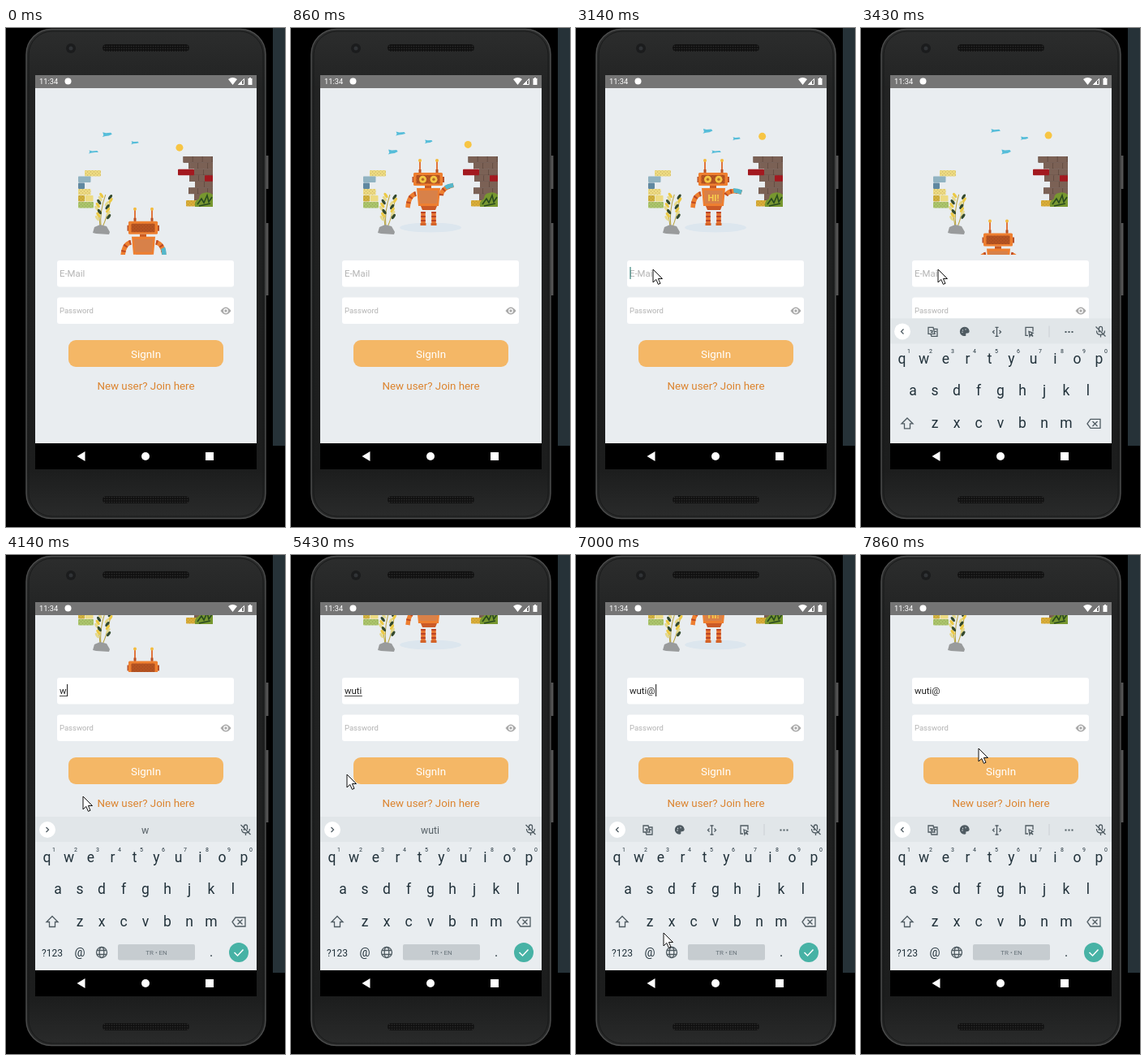
Animation, 344 px wide and 614 px high, one loop 8 s. Source, as an HTML page:

```html
<!DOCTYPE html>
<html lang="en">
<head>
<meta charset="utf-8">
<title>Sign-in screen</title>
<style>
  html, body { margin: 0; width: 100%; height: 100%; overflow: hidden; background: #000; }
  svg { display: block; width: 100vw; height: 100vh; }
  text { font-family: Roboto, "Open Sans", sans-serif; }
  .mid { text-anchor: middle; }
  .line { fill: none; stroke: #4f5b62; stroke-width: 1.3; }
</style>
</head>
<body>
<svg viewBox="0 0 344 614">
  <defs>
    <clipPath id="page"><rect x="36" y="74" width="273" height="437"/></clipPath>
    <clipPath id="art"><rect x="63" y="80" width="218" height="199"/></clipPath>
    <linearGradient id="shell" x2="0" y2="1">
      <stop stop-color="#2c2d2d"/><stop offset=".12" stop-color="#222323"/>
      <stop offset=".9" stop-color="#1c1d1d"/><stop offset="1" stop-color="#2a2b2b"/>
    </linearGradient>
    <pattern id="mesh" width="3" height="3" patternUnits="userSpaceOnUse">
      <rect width="3" height="3" fill="#111"/><circle cx="1.5" cy="1.5" r=".8" fill="#2c2c2c"/>
    </pattern>
    <pattern id="grain" width="4" height="4" patternUnits="userSpaceOnUse">
      <path d="M0 1h1M2 3h1" stroke="#6b3a1c" stroke-opacity=".55"/>
    </pattern>
  </defs>

  <!-- Device -->
  <rect width="344" height="614"/>
  <rect x="329" width="15" height="514" fill="#263238"/>
  <path d="M322 157v41M322 240v89" stroke="#555" stroke-width="3"/>
  <rect x="25" y="1.5" width="295" height="602" rx="31" fill="url(#shell)" stroke="#4b4c4c" stroke-width="1.5"/>
  <rect x="28" y="4" width="289" height="597" rx="29" fill="none" stroke="#191a1a"/>
  <circle cx="80" cy="25" r="6" fill="#1b1c1d"/><circle cx="80" cy="25" r="2.5" fill="#303336"/>
  <rect x="119" y="20" width="107" height="9" rx="4.5" fill="url(#mesh)"/>
  <rect x="119" y="576" width="107" height="9" rx="4.5" fill="url(#mesh)"/>
  <rect x="36" y="58" width="273" height="485" fill="#e9edf0"/>

  <g clip-path="url(#page)">
    <g id="content">
      <g clip-path="url(#art)">
        <g id="bricks"></g>
        <g id="bush">
          <path d="M233 220q-1-8 5-10 0-6 6-7 6-2 11 2v15z" fill="#77972f"/>
          <path d="M236 217l5-7 3 5 4-9 2 8 4-6M238 219l14-3" fill="none" stroke="#294a1f" stroke-width="1.6"/>
        </g>
        <g id="birds" fill="#56bdd9"></g>
        <circle id="sun" r="4.5" fill="#f7c544"/>
        <ellipse id="shadow" cx="172" cy="245.5" rx="38" ry="6" fill="#dce6ee"/>
        <g id="robot">
          <path d="M159 179v-15M180 179v-15" stroke="#df6829" stroke-width="1.8"/>
          <path d="M157.500 178v-4h3v4M178.500 178v-4h3v4" fill="#b95124"/>
          <circle cx="159" cy="163" r="2" fill="#f3bb3d"/><circle cx="180" cy="163" r="2" fill="#f3bb3d"/>
          <path d="M149.500 183h2v7h-2zM187 183h2v7h-2z" fill="#b7522a"/>
          <rect x="151" y="178" width="36" height="16" rx="1.500" fill="#ee7f30"/>
          <rect x="154.500" y="181" width="29" height="10.500" rx="1" fill="#b75321"/>
          <rect x="154.500" y="181" width="29" height="10.500" fill="url(#grain)"/>
          <g id="eyes">
            <g fill="#f4c443"><circle cx="162.500" cy="186.300" r="4.500"/><circle cx="176" cy="186.300" r="4.500"/></g>
            <g fill="#b36a23"><circle cx="162.500" cy="186.300" r="1.700"/><circle cx="176" cy="186.300" r="1.700"/></g>
          </g>
          <rect x="165" y="194" width="8" height="4" fill="#c95b24"/>
          <path d="M155 197h29l-2 22h-25z" fill="#ee7f30"/>
          <path d="M158 200h23l-1 16h-21z" fill="#d88149"/>
          <path d="M160 219h20l-2 5h-16z" fill="#cb5a27"/>
          <g id="greeting"><text class="mid" y="4" font-size="11" font-weight="700" fill="#f8d04c">HI!</text></g>
          <g fill="none" stroke-width="5.500">
            <path d="M163 226v15M176 226v15" stroke="#e87431"/>
            <path d="M163 226v15M176 226v15" stroke="#b94326" stroke-dasharray="2 3"/>
            <path id="armL" d="M154 204q-9 2-10 17" stroke="#ee7f30"/>
            <path d="M154 204q-9 2-10 17" stroke="#bc4a25" stroke-dasharray="2 5"/>
            <g id="arm">
              <path d="M185 204q9 2 10 17" stroke="#ee7f30"/>
              <path d="M185 204q9 2 10 17" stroke="#bc4a25" stroke-dasharray="2 5"/>
              <path d="M193.500 211q1.500 3 1.500 10" stroke="#55b7cb"/>
            </g>
          </g>
          <path d="M159.500 240h7v3h-7zM172.500 240h7v3h-7z" fill="#d36329"/>
        </g>
        <g id="plant"></g>
        <path d="M107 252l2-7 7-3 8 2 4 7-1 3-16-1z" fill="#999b9c"/>
      </g>

      <rect x="63" y="286" width="218" height="32.500" rx="3" fill="#fff"/>
      <rect x="63" y="331.500" width="218" height="32.500" rx="3" fill="#fff"/>
      <text id="hint" x="66" y="306" font-size="11.400" fill="#b3b3b3">E-Mail</text>
      <text id="entry" x="66" y="306" font-size="11.400" fill="#222"></text>
      <path id="underline" stroke="#333" stroke-width=".9"/>
      <path id="caret" stroke-width="1.200"/>
      <text x="66" y="351" font-size="9.500" fill="#b3b3b3">Password</text>
      <path d="M264.500 348q6.500-9 13 0-6.500 9-13 0z" fill="#aaa"/>
      <circle cx="271" cy="348" r="2.300" fill="#aaa" stroke="#fff" stroke-width="1.200"/>
      <rect x="77" y="384" width="191" height="33" rx="9" fill="#f4b766"/>
      <text class="mid" x="172.500" y="405.500" font-size="13.350" fill="#fff">SignIn</text>
      <text class="mid" x="172.500" y="444.500" font-size="13.350" fill="#dc842f">New user? Join here</text>
    </g>

    <g id="keyboard">
      <rect x="36" y="322" width="273" height="189" fill="#e9edf0"/>
      <rect x="36" y="322" width="273" height="31" fill="#e1e6e9"/>
      <circle cx="51" cy="338" r="10" fill="#fff"/>
      <path id="chevron" class="line"/>
      <text id="suggestion" class="mid" x="171.500" y="342.500" font-size="12.300" fill="#555f65"></text>
      <g id="tools" class="line">
        <path d="M83 333h6l2 8h-8zM89 335h5v9h-7l-1-3M90 338h3M85 337h3v2h-2"/>
        <path d="M127.500 333a5 5 0 1 0 0 10q2 0 1-2 0-1.500 2-1.500 2.500 0 2.500-2-1-4.500-5.500-4.500z" fill="#4f5b62"/>
        <path d="M125 336.500h1M128.500 335.500h1M124.500 339h1" stroke="#e1e6e9"/>
        <path d="M165.500 333h4M167.500 333v11M165.500 344h4M164.500 336.500l-2 2 2 2M170.500 336.500l2 2-2 2"/>
        <path d="M206 343h-3v-10h9v5M207 338l5 2-2 1 2 3-3-2-1 2z"/>
        <path d="M232 331v14" stroke="#cfd5d9"/>
        <path d="M251.500 338.500h2m2 0h2m2 0h2" stroke-width="2"/>
      </g>
      <path class="line" d="M293.500 339v-5a2 2 0 0 1 4 0v4M290.500 337q0 5 5 5 5 0 5-5M295.500 342v3M289.500 332l12 12"/>
      <g id="keys" class="mid" fill="#22323b"></g>
      <path class="line" d="M57 444.500l7 7h-3.500v6h-7v-6h-3.500z"/>
      <path class="line" d="M279 451.500l4-5.500h12v11h-12zM285.500 448.500l6 6m0-6l-6 6"/>
      <g class="line">
        <circle cx="118" cy="489" r="6.500"/><ellipse cx="118" cy="489" rx="2.800" ry="6.500"/>
        <path d="M112 486.500h12M112 491.500h12"/>
      </g>
      <rect x="138" y="479" width="95" height="19.500" rx="2" fill="#c6ccd0"/>
      <text class="mid" x="185.500" y="492" font-size="8" fill="#68737a">TR • EN</text>
      <circle cx="287" cy="489" r="12" fill="#47b2a5"/>
      <path d="M281.500 489l4 4 7-7.500" fill="none" stroke="#fff" stroke-width="1.500"/>
    </g>
  </g>

  <!-- System bars -->
  <rect x="36" y="58" width="273" height="16" fill="#757575"/>
  <text x="41" y="69.300" font-size="9.300" fill="#fff">11:34</text>
  <circle cx="76.500" cy="65.500" r="4" fill="#fff"/>
  <path d="M274 63q5.500-4 11 0l-5.500 7zM298.500 62h1.500v-1h2v1h1.500v8h-5z" fill="#fff"/>
  <path d="M286.500 69.500h7v-7z" fill="none" stroke="#fff"/><path d="M286 70h5v-5z" fill="#fff"/>
  <rect x="36" y="511" width="273" height="32"/>
  <path d="M87.500 527l10-6v12zM246 522h10v10h-10z" fill="#fff"/>
  <circle cx="172" cy="527" r="5" fill="#fff"/>
  <path id="pointer" d="M0 0V16L3.800 12.400 6.400 18.400 9 17.300 6.400 11.500H11.500Z" fill="#fff" stroke="#111"/>
</svg>

<script>
const LOOP = 8000, CYCLE = 4200, CYCLE_LEAD = 187;
const FOCUS = 2850, AT_SIGN = 5900;
const typed = [[4000, 'w'], [4350, 'wu'], [4600, 'wut'], [4850, 'wuti'], [AT_SIGN, 'wuti@']];
const pointerPath = [
  [2500, 130, 420], [2800, 95, 297], [4750, 95, 297], [5100, 69, 270], [5430, 69, 270],
  [5700, 86, 487], [5950, 86, 487], [6290, 103, 458], [7000, 108, 465], [7600, 145, 238], [LOOP, 145, 238]
];

const $ = id => document.getElementById(id);
const set = (id, attrs) => { for (const k in attrs) $(id).setAttribute(k, attrs[k]); };
const move = (id, x, y, more = '') => set(id, { transform: `translate(${x} ${y}) ${more}` });
const show = (id, on) => set(id, { visibility: on ? 'visible' : 'hidden' });
const ramp = (t, from, to) => {
  const u = Math.min(1, Math.max(0, (t - from) / (to - from)));
  return u * u * (3 - 2 * u);
};

// Brick walls
const brick = (x, y, w, color, grain = false) => {
  const box = `<rect x="${x}" y="${y}" width="${w}" height="7.4" rx=".8" fill="`;
  return box + color + '"/>' + (grain ? box + 'url(#grain)" opacity=".6"/>' : '');
};
let wall = brick(97, 175, 20, '#eddb82', true) + brick(89, 182.500, 15.500, '#91b3c1')
  + brick(89, 190.500, 8, '#6088a0') + brick(89, 198, 15.500, '#eddb82', true)
  + brick(89, 206, 8, '#d2b33f', true) + brick(97.500, 206, 10, '#eddb82')
  + brick(89, 214, 19, '#aac66c', true);
const wallStart = [218.500, 225, 232, 226, 233, 225, 232];
wallStart.forEach((start, row) => {
  const y = 158 + row * 7.700;
  wall += `<rect x="${start}" y="${y}" width="${255 - start}" height="7.700" fill="#5d463d"/>`;
  for (let x = start; x < 255; x += 12) wall += brick(x, y, Math.min(11.300, 255 - x), '#7b6155');
});
wall += brick(212, 173.800, 20, '#a3191f') + brick(245, 181.300, 10, '#a3191f')
  + brick(222, 212, 17, '#d9ae38', true);
$('bricks').innerHTML = wall;

// Plant
let plant = '<path d="M117 245q-2-20 5-40M119 245q6-14 9-32M116 245q-1-14-4-23" fill="none" stroke="#b7a23b"/>';
for (let i = 0; i < 15; i++) {
  const side = i % 2 ? 1 : -1, y = 206 + i * 2;
  const x = 121 - i * .2 + side * (4 + i * 3 % 5);
  plant += `<ellipse cx="${x}" cy="${y}" rx="1.7" ry="3.6" transform="rotate(${side * 35} ${x} ${y})"
    fill="${['#ecc944', '#33492e', '#e5d98c'][i % 3]}"/>`;
}
$('plant').innerHTML = plant;

// Keys
const key = (label, x, y, size) => `<text x="${x}" y="${y}" font-size="${size}">${label}</text>`;
const row = (letters, x, y) => [...letters].map((c, i) => key(c, x + i * 27, y, 17.500)).join('');
$('keys').innerHTML = row('qwertyuiop', 50.500, 378) + row('asdfghjkl', 64, 417) + row('zxcvbnm', 91, 457)
  + [...'1234567890'].map((c, i) => key(c, 59 + i * 27, 365, 7)).join('')
  + key('?123', 57, 493.500, 12) + key('@', 91, 494, 14.500) + key('.', 253, 494, 16);

const birds = [[122.500, 12, 131.300, -1.300, 1], [156.700, 12.400, 141.500, -1.600, .8], [104, 20.700, 152.500, 0, 1]];

function drawArt(t) {
  const cycle = (t + CYCLE_LEAD) % CYCLE, s = cycle / 1000;
  const up = ramp(cycle, 0, 375) - ramp(cycle, 3400, 3775);
  move('robot', 0, 120 * (1 - up));
  set('shadow', { opacity: ramp(up, .6, 1) });
  show('eyes', cycle > 550 && cycle < 3420);
  const raise = ramp(cycle, 500, 850) - ramp(cycle, 3250, 3450);
  const wave = 5 * Math.sin(s * 9) * raise;
  set('arm', { transform: `rotate(${-100 * raise + wave} 186 205)` });
  const hi = ramp(cycle, 2000, 2400) - ramp(cycle, 3350, 3500);
  move('greeting', 169.500, 209, `scale(${hi})`);
  set('plant', { transform: `rotate(${2 * Math.sin(s * 3)} 117 245)` });
  move('sun', 213 + 5 * s, 148 - 4.400 * s);
  $('birds').innerHTML = birds.map(([x, vx, y, vy, size], i) => {
    const flap = 1 + Math.sin(s * 12 + i);
    return `<path transform="translate(${x + vx * s} ${y + vy * s}) scale(${size})"
      d="M-5.500 ${-2 - flap / 2}l4 1 6 -.5 1.500 2-4 ${flap} -4 .5 -4 1 1.500-2z"/>`;
  }).join('');
}

function drawForm(t) {
  const last = typed.filter(([at]) => t >= at).pop();
  const text = last ? last[1] : '';
  const composing = text && t < AT_SIGN;
  $('entry').textContent = text;
  show('hint', !text);
  const end = 66.500 + (text ? $('entry').getComputedTextLength() : 0);
  set('underline', { d: composing ? `M66 308.500H${end}` : 'M0 0' });
  set('caret', { d: `M${end + .5} 294v15`, stroke: text ? '#333' : '#3b877f' });
  const since = t - (last ? last[0] : FOCUS);
  show('caret', since >= 0 && since % 1000 < 500);

  move('content', 0, -135 * ramp(t, 3430, 3640));
  move('keyboard', 0, 190 * (1 - ramp(t, 3250, 3500)));
  $('suggestion').textContent = composing ? text : '';
  show('tools', !composing);
  set('chevron', { d: composing ? 'M49.500 335l3 3-3 3' : 'M52.500 335l-3 3 3 3' });
}

function drawPointer(t) {
  const next = pointerPath.findIndex(([at]) => at > t);
  show('pointer', next > 0);
  if (next < 1) return;
  const [t0, x0, y0] = pointerPath[next - 1], [t1, x1, y1] = pointerPath[next];
  const u = ramp(t, t0, t1);
  move('pointer', x0 + (x1 - x0) * u, y0 + (y1 - y0) * u);
}

function frame(now) {
  const t = now % LOOP;
  drawArt(t);
  drawForm(t);
  drawPointer(t);
  requestAnimationFrame(frame);
}
frame(performance.now());
</script>
</body>
</html>
```
